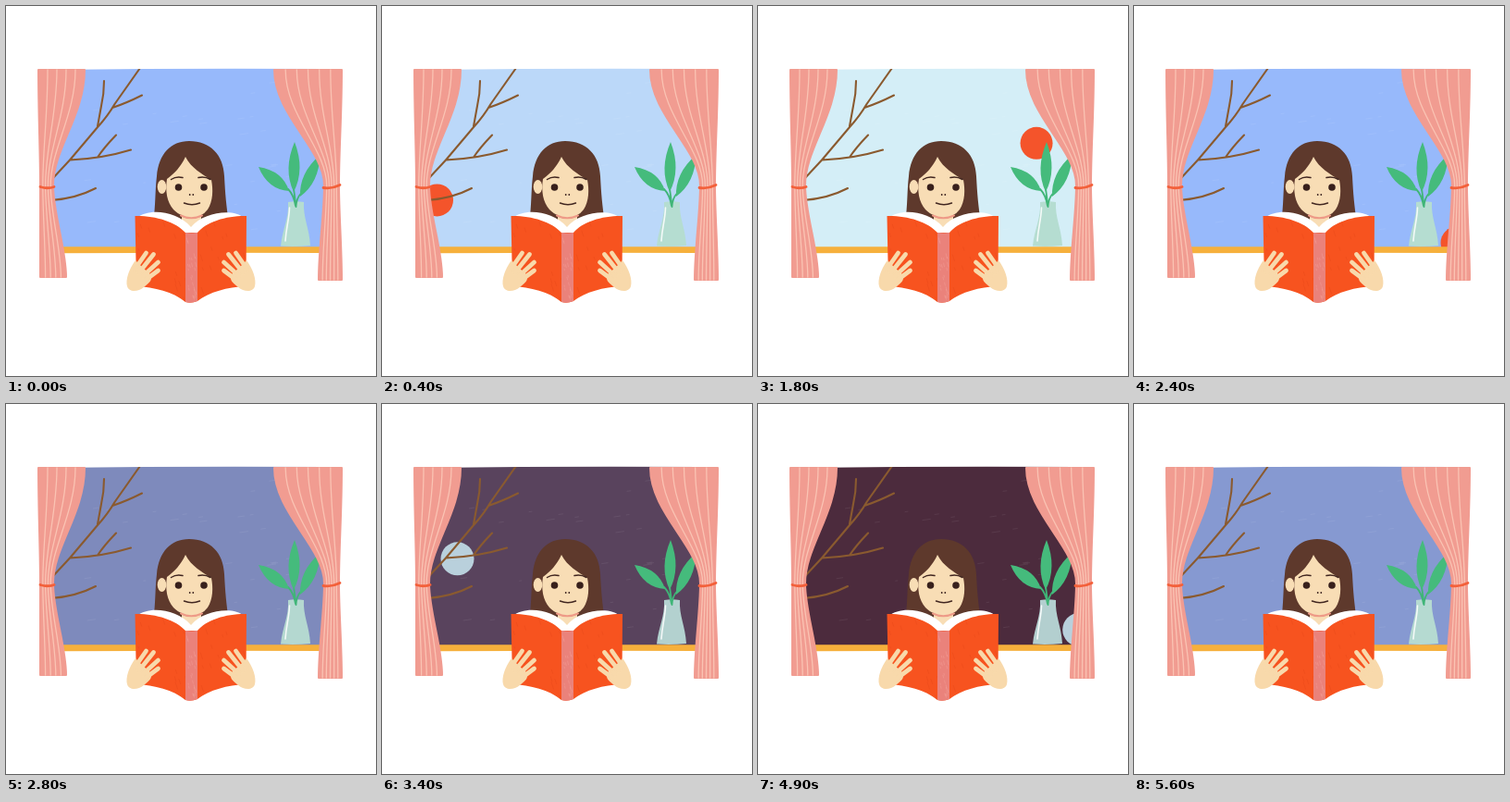
Recreate the animation shown at these times as an HTML page. Size 400 by 400 pixels, loop 5800 ms.

```html
<!DOCTYPE html>
<html lang="en">
<head>
<meta charset="utf-8">
<title>Reading by the window</title>
<style>
  html, body { margin: 0; width: 100%; height: 100%; overflow: hidden; background: #fff; }
  svg { display: block; width: 100vw; height: 100vh; }
  .line { fill: none; stroke-linecap: round; stroke-linejoin: round; }
</style>
</head>
<body>
<svg viewBox="0 0 400 400">
  <defs>
    <clipPath id="pane"><path d="M49 69 Q200 67 345 68 L344 262 L50 262Z"/></clipPath>
    <clipPath id="bookClip"><use href="#cover"/></clipPath>
    <g id="hand">
      <path d="M140 275 C133 284 129 296 131 303 C133 310 143 309 149 304 C155 299 158 297 157 291 L147 282Z" fill="#f8d9ab"/>
      <path class="line" d="M139 285 L151.500 267 M144 288 L159.500 268.500 M148 292 L164.500 277 M151 296 L164.500 286" stroke="#f8d9ab" stroke-width="4.800"/>
    </g>
  </defs>

  <g clip-path="url(#pane)">
    <rect id="sky" x="48" y="66" width="300" height="198"/>
    <path id="skyMarks" class="line" stroke="#fff" stroke-opacity=".09" stroke-width=".8"/>
    <circle id="sun" r="17.500" fill="#f4542b"/>
    <circle id="moon" r="18" fill="#b9d0dc"/>
    <path class="line" stroke="#8a5a2f" stroke-width="2.100" d="M145 67 L117.500 106 Q110 119 99 131 L69 166.500 L49 188
      M106 81 Q106 95 103 108 L99 130 M115 110 Q130 105 147 96.500
      M69 166.500 Q104 165 135 155.500 M99 163.500 Q106 153 119 139.500 M49 210 Q76 208 97 197"/>
  </g>

  <path d="M59 260.300 H342 V267 Q200 266.500 59 267.300Z" fill="#f6b03c"/>

  <path id="glass" d="M305 212 Q313.500 210.500 322 212 C321 229 328 240 329 259 Q313 260.500 297 259.500 C299 240 306 230 305 212Z"/>
  <path class="line" d="M306.500 218 C306 232 303 238 302 254" stroke="#fff" stroke-opacity=".85" stroke-width="1.600"/>
  <path class="line" d="M305 198 Q311 204 313 216 M311 197 L313.500 217 M318.500 203 Q314 208 313.500 217" stroke="#3fb577" stroke-width="1.800"/>
  <path id="leaves" fill="#45bb7c"/>

  <path d="M159 235 C162 215 161 200 163 184 C165 160 178 146 198 146 C221 146 235 161 236 184 C237 203 238 215 241 235Z" fill="#5e392c"/>
  <ellipse cx="168.500" cy="195.500" rx="4.800" ry="7.500" fill="#f8ddb5"/>
  <path d="M194 163 C189 174 182 181 174 187 C172 200 174 212 181 220 Q186 225 190 226 V245 H211 V226 Q215 224 218 220 C224 211 224 198 222 188 C212 182 200 175 194 163Z" fill="#f8ddb5"/>
  <path class="line" d="M189 226.500 Q200 232 212 226.500" stroke="#ee9a87" stroke-width="2"/>
  <path class="line" d="M178.500 187.500 Q184 183.800 191 185.500 M208 185.500 Q215 183.800 221 187.500 M192.500 213 Q201 216.500 209.500 213" stroke="#412620" stroke-width="1.500"/>
  <g fill="#38201c">
    <circle cx="186.500" cy="196" r="3.800"/><circle cx="214" cy="196" r="3.800"/>
    <circle cx="198.700" cy="204" r=".9"/><circle cx="202.300" cy="204" r=".9"/>
  </g>

  <path d="M142 229 C152 219 184 220 200 239 C214 222 247 219 257 229 L207 250 H194Z" fill="#fff"/>
  <path id="cover" d="M139.500 227 C161 226.500 183 233 194 245 H207 C217 233 239 226.500 260 227 L259.500 303 C239 304 220 309 207 319 Q200 322 194 320 C181 309 160 304 141 303Z" fill="#f7531f"/>
  <g clip-path="url(#bookClip)">
    <path id="bookMarks" class="line" stroke="#dc4417" stroke-opacity=".3" stroke-width="1"/>
    <path d="M194 244 Q201 247 207 244 V321 H194Z" fill="#ea827b"/>
    <path id="spineMarks" class="line" stroke="#f3aaa0" stroke-opacity=".5" stroke-width=".7"/>
  </g>
  <use href="#hand"/>
  <use href="#hand" transform="translate(400 0) scale(-1 1)"/>

  <g stroke="#f19c91" stroke-width="2" stroke-linejoin="round" fill="#f19c91">
    <path id="leftCloth"/><path id="rightCloth"/>
  </g>
  <g class="line" stroke="#fac3b3" stroke-width="1.300">
    <path id="leftFolds"/><path id="rightFolds"/>
  </g>
  <path class="line" d="M37 195.500 Q45 198 52 195.500 M343 196.500 Q352 198 361 193.500" stroke="#f3603a" stroke-width="2.800"/>
</svg>

<script>
const LOOP = 5800, STEP = 200, LONG_STEP = 300;
const LONG_HOLDS = [4400, 4900];
const BLUE = [151, 185, 251], PALE = [222, 247, 246], DARK = [76, 43, 61];
const DAY_GLASS = [181, 221, 209], NIGHT_GLASS = [179, 207, 207];

const el = id => document.getElementById(id);
const lerp = (a, b, k) => a + (b - a) * k;
const clamp = k => Math.max(0, Math.min(1, k));
const mix = (a, b, k) => a.map((v, i) => Math.round(lerp(v, b[i], k)));
const fill = (id, color) => el(id).setAttribute("fill", `rgb(${color})`);
const shape = (id, d) => el(id).setAttribute("d", d);

// Rises from a to b, stays at 1, falls from c to d.
const plateau = (t, a, b, c, d) => Math.min(clamp((t - a) / (b - a)), clamp((d - t) / (d - c)));

// Time of the drawing on show: even steps with a few longer holds.
function held(now) {
  let t = 0, next = STEP;
  while (next <= now) {
    t = next;
    next += LONG_HOLDS.includes(t) ? LONG_STEP : STEP;
  }
  return t;
}

// Carries a disc over the window in one even sweep.
function arc(id, t, rise, set) {
  const p = (t - rise) / (set - rise);
  const up = p >= 0 && p <= 1;
  el(id).setAttribute("visibility", up ? "visible" : "hidden");
  if (!up) return;
  const x = 198 - 151 * Math.cos(Math.PI * p);
  const y = 256 - 167 * Math.abs(Math.sin(Math.PI * p)) ** 1.4;
  el(id).setAttribute("transform", `translate(${x} ${y})`);
}

function draw(ms) {
  const t = held(ms % LOOP);
  const day = plateau(t, 0, 800, 1700, 2400);
  const night = plateau(t, 2400, 3600, 4900, LOOP);
  fill("sky", mix(mix(BLUE, PALE, day), DARK, night));
  fill("glass", mix(DAY_GLASS, NIGHT_GLASS, night));
  arc("sun", t, 100, 2400);
  arc("moon", t, 2950, 5000);
}

// Each pair holds the outer and the inner x of the cloth at that height.
function curtain(side, top, tie, foot, bottom, folds) {
  const edge = k => {
    const [a, b, c] = [top, tie, foot].map(pair => lerp(...pair, k));
    return [[a, 69], [a, 118], [b, 155], [b, 194], [b, 224], [c, 262], [c, bottom]];
  };
  const curve = ([p, ...rest]) => `${p} C${rest.join(" ")}`;
  shape(side + "Cloth", `M${curve(edge(0))} L${curve(edge(1).reverse())}Z`);
  let d = "";
  for (let i = 1; i <= folds; i++) d += "M" + curve(edge(i / (folds + 1)));
  shape(side + "Folds", d);
}

function leaf(x, y, tipX, tipY, width) {
  const dx = tipX - x, dy = tipY - y, len = Math.hypot(dx, dy);
  const bulge = s => `${x + dx * 0.45 - s * dy / len * width} ${y + dy * 0.45 + s * dx / len * width}`;
  return `M${x} ${y}Q${bulge(1)} ${tipX} ${tipY}Q${bulge(-1)} ${x} ${y}`;
}

// Loose crayon marks inside a box.
function marks(id, seed, count, [x, y, w, h], dx, dy) {
  const rand = () => (seed = (seed * 16807) % 2147483647) / 2147483647;
  let d = "";
  for (let i = 0; i < count; i++) {
    const len = 0.3 + rand();
    d += `M${x + rand() * w} ${y + rand() * h}l${dx * len} ${dy * len}`;
  }
  shape(id, d);
}

curtain("left", [35, 85], [37, 51], [37, 65], 293, 4);
curtain("right", [363, 290], [360, 344], [363, 338], 296, 5);
shape("leaves", leaf(306, 200, 273, 174, 13) + leaf(311, 201, 312, 147, 12) + leaf(318, 206, 339.5, 161, 12));
marks("skyMarks", 71, 40, [52, 72, 285, 184], 7, -1);
marks("bookMarks", 23, 40, [140, 230, 118, 85], 2, 6);
marks("spineMarks", 9, 24, [195, 246, 11, 70], 1, 4);

const start = performance.now();
function tick() {
  draw(performance.now() - start);
  requestAnimationFrame(tick);
}
tick();
</script>
</body>
</html>
```
